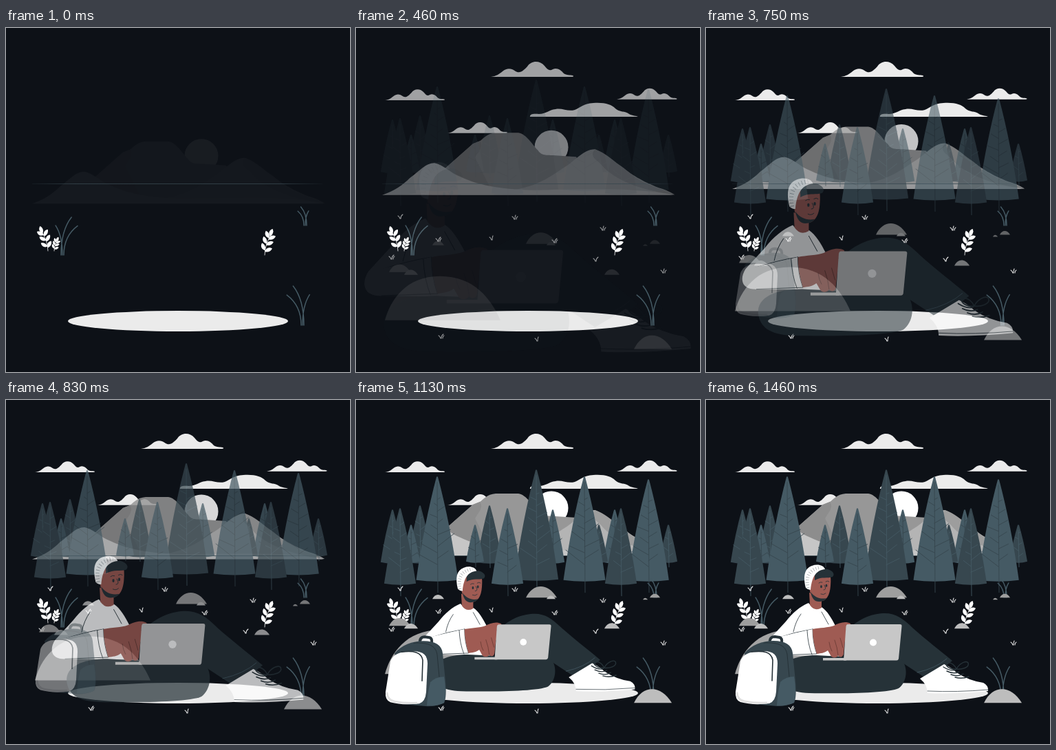
Animation of 500 by 500 pixels, one loop 1.5 s. Source, as an HTML page:

```html
<!DOCTYPE html>
<html lang="en">
<head>
<meta charset="utf-8">
<title>Working outdoors</title>
<style>
html, body { margin: 0; width: 100%; height: 100%; overflow: hidden; background: #0d1117; }
svg { display: block; width: 100vw; height: 100vh; }
</style>
</head>
<body>
<svg viewBox="0 0 500 500" fill="none" stroke-linecap="round" stroke-linejoin="round">
  <defs>
    <linearGradient id="fade">
      <stop offset="0" stop-color="#37474f" stop-opacity=".2"/>
      <stop offset=".15" stop-color="#37474f"/>
      <stop offset=".85" stop-color="#37474f"/>
      <stop offset="1" stop-color="#37474f" stop-opacity=".1"/>
    </linearGradient>
    <path id="puff" d="M0 0C8 -1 12 -4 17 -8C24 -14 31 -12 36 -8C43 -4 48 -10 53 -15C59 -24 71 -24 78 -16C82 -11 85 -8 90 -11C96 -14 102 -10 106 -5C110 -2 115 -3 119 -2C121 -1 120 0 117 0Z"/>
  </defs>

  <g id="clouds" fill="#ebebeb">
    <use href="#puff" transform="translate(196 71)"/>
    <use href="#puff" transform="translate(42 105) scale(.725)"/>
    <use href="#puff" transform="translate(379 103.7) scale(.73)"/>
    <use href="#puff" transform="translate(133 152.8) scale(.725)"/>
    <path d="M253 129C252 125 258 124 266 125C276 125 280 119 290 118C300 116 308 122 318 119C326 116 330 110 345 109C362 108 371 111 377 117C383 123 391 120 397 125C402 128 407 127 410 129Z"/>
  </g>

  <g id="hills">
    <circle cx="284" cy="157" r="24.5" fill="#fff"/>
    <path fill="#979797" d="M110 205L170 152L180 148C186 144 190 137 203 136H236C248 138 256 153 264 161C270 170 276 168 290 169L320 171L350 226H100Z"/>
    <path fill="#8d8d8d" d="M180 148C186 155 178 164 173 172L200 226H110V205L170 152Z"/>
    <path fill="#b4b4b4" d="M200 222C250 220 273 207 300 188C318 178 330 160 347 160C356 163 362 168 380 181C402 198 415 206 440 216Q452 219 463 226H150Z"/>
    <path fill="#9d9d9d" d="M347 160C338 172 352 176 358 184C370 198 400 218 463 226C450 219 440 218 425 211C402 201 395 190 380 181C365 168 356 163 347 160Z"/>
    <path fill="#c6c6c6" d="M38 226.500C55 221 68 212 78 202C92 192 101 180 114 180C127 182 136 194 152 200C180 214 220 219 260 219C330 219 400 214 462 226.500Z"/>
  </g>
  <rect x="38" y="226" width="422" height=".8" fill="url(#fade)"/>

  <g id="trees"></g>
  <g id="blades" stroke="#455a64" stroke-width="1.5"></g>
  <g id="leaves" fill="#fff" stroke="#fff" stroke-width=".8"></g>
  <ellipse cx="250" cy="426" rx="160" ry="15" fill="#ebebeb"/>
  <g id="tufts" stroke="#ebebeb" stroke-width="1.1"></g>

  <g id="rocks">
    <path fill="#a3a3a3" d="M42 399C50 370 72 335 122 335C172 335 196 368 210 399Z"/>
  </g>

  <g id="person">
    <path fill="#263238" d="M200 378L206 334C224 316 244 310 260 310C276 310 287 318 300 331C318 347 340 364 358 379Q340 395 316 402L278 377L268 400Z"/>
    <path stroke="#455a64" stroke-width=".8" d="M350 376Q334 390 307 396"/>
    <path fill="#fff" d="M311 405L346 384Q357 389 364 396Q382 408 403 411Q411 415 410 423Q360 428 322 426Q322 414 311 405Z"/>
    <path stroke="#263238" stroke-width=".7" d="M322 423Q365 425 410 421"/>
    <path stroke="#263238" stroke-width="1.4" d="M345 388Q356 395 363 392M350 394Q360 399 368 395M356 399Q366 403 374 398M362 403Q372 406 382 402M363 391C353 392 345 384 351 382C357 381 362 386 364 391C368 383 378 378 381 382C384 389 371 392 364 391"/>

    <path fill="#fff" d="M149 295C137 300 126 309 116 322L93 347C86 358 88 370 102 371L190 372L188 328C183 318 176 306 168 301C160 306 154 301 149 295Z"/>
    <path fill="#9f5b53" d="M150 280L151 298Q158 308 168 302L168 288Z"/>
    <path stroke="#263238" stroke-width=".8" d="M138 311Q130 322 127 337M103 346Q130 337 155 333M168 308L178 326"/>
    <path fill="#263238" d="M108 400C106 380 130 371 160 371L285 378C294 390 292 410 280 419C265 426 200 427 150 426C120 425 110 415 108 400Z"/>

    <path fill="#9f5b53" d="M150 265C150 281 154 293 164 293C175 293 180 284 181 270Q182 258 180 253L158 250Z"/>
    <path fill="#263238" d="M152 279C154 289 158 293 164 293C169 293 173 291 175 288C166 290 158 287 152 279Z"/>
    <path fill="#263238" d="M158 259C157 248 167 245 177 246C184 248 188 253 184 257C176 260 169 256 158 262Z"/>
    <path fill="#fff" d="M145 273C141 256 143 245 154 241C162 238 171 240 173 246C162 247 154 254 152 276Q148 276 145 273Z"/>
    <path stroke="#9aa0a3" stroke-width="5" stroke-dasharray=".7 3" stroke-linecap="butt" d="M148 273C145 256 150 246 167 243"/>
    <path stroke="#263238" stroke-width=".8" d="M172 269Q176 276 171 276M167 282Q171 284 174 281M164 266Q166 264 169 265M174 264Q177 262 179 264"/>
    <path stroke="#263238" stroke-width="2.600" d="M167.500 270.500V272M175 269V270.500"/>

    <path fill="#c7c7c7" d="M170 375H204V378.500H170Z"/>
    <path fill="#fff" d="M99 346L155 333L161 369L104 371Z"/>
    <path stroke="#263238" stroke-width=".8" d="M147 335Q148 355 154 370M155 333Q155 352 161 369L106 371"/>
    <path fill="#9f5b53" d="M155 333C165 331 178 331 186 328C193 324 203 321 210 325C211 329 207 332 203 334C207 338 205 345 202 350L200 368C200 374 194 375 192 371C191 375 183 376 181 371L177 364C172 368 167 368 161 369Q155 350 155 333Z"/>
    <path stroke="#5f342f" stroke-width=".7" d="M187 349Q191 360 192 371M179 352Q180 360 183 365M195 346L199 360"/>
    <path fill="#c7c7c7" d="M206 326H282Q285 326 284.500 329L280 376Q279.500 378.500 277 378.500H200L203.500 329Q204 326 206 326Z"/>
    <circle cx="243" cy="352.500" r="5" fill="#fff"/>
  </g>

  <g id="bag">
    <path stroke="#263238" stroke-width="4" d="M93 353Q92 344 100 344L107 345Q111 346 110 354"/>
    <path fill="#37474f" d="M56 368C66 356 82 350 98 350C115 350 125 356 126 368L130 408Q132 432 128 440Q118 445 104 445L70 442Z"/>
    <path fill="#455a64" d="M108 410Q116 402 128 402Q132 425 128 440Q118 445 103 444Q104 425 108 410Z"/>
    <path fill="#fff" d="M50 380C54 368 66 365 84 365C98 365 104 371 104 383L102 424Q101 438 92 441Q68 444 50 439Q42 436 43 424Z"/>
    <path stroke="#e0e0e0" stroke-width="3" d="M45 426Q46 436 56 438Q72 441 88 440"/>
    <path stroke="#263238" stroke-width="1.600" d="M66 366C84 364 95 366 97 378L96 408"/>
    <path stroke="#263238" d="M84 353C106 352 116 357 118 370L121 402"/>
  </g>
</svg>
<script>
const $ = id => document.getElementById(id);
const add = (id, html) => $(id).insertAdjacentHTML('beforeend', html);
let seed = 7;
const rand = () => (seed = seed * 16807 % 2147483647) / 2147483647;

function tree(x, top, low, dark) {
  const h = low - top, w = 3.5 + h * .18;
  const colors = ['#455a64', '#37474f'];
  let d = `M${x} ${top + 8}L${x + 1} ${low + (low > 240 ? 18 : 8)}`;
  for (let i = 0, n = h / 13; i < n; i++) {
    const part = .22 + .66 * i / n, reach = (i % 2 ? -w : w) * part * (.5 + .7 * rand());
    d += `M${x} ${top + h * part}l${reach} ${-Math.abs(reach) * (.4 + .4 * rand())}`;
  }
  add('trees', `<path fill="${colors[+dark]}" d="M${x - 1} ${top}Q${x} ${top - 1} ${x + 1} ${top}
    Q${x + w * .62} ${top + h * .45} ${x + w} ${low}Q${x} ${low + 4} ${x - w} ${low}
    Q${x - w * .62} ${top + h * .45} ${x - 1} ${top}Z"/><path stroke="${colors[+!dark]}" stroke-width=".9" d="${d}"/>`);
}
function grove(top, low, light, dark) {
  dark.forEach(x => tree(x, top, low, true));
  light.forEach(x => tree(x, top, low, false));
}
grove(159, 235, [286, 376], [53]);
grove(153, 235, [], [93, 194]);
grove(181, 234, [80, 173], [353, 454]);
grove(101, 260, [], [262]);
grove(111, 261, [118, 332], []);
grove(115, 261, [425], []);
grove(157, 266, [220], [64, 385]);

// three bent blades, the tallest leaning to one side
function grass(x, y, h, lean) {
  const d = [[.24, 1], [-.18, .78], [.4, .77]].map(([dx, dy], i) => {
    const foot = x + (i - 1) * 2 * lean;
    return `M${foot} ${y}Q${foot} ${y - h * dy * .65} ${x + lean * dx * h} ${y - h * dy}`;
  });
  add('blades', `<path d="${d.join('')}"/>`);
}
grass(82, 330, 55, 1);
grass(435, 287, 27, -1);
grass(431, 432, 57, -1);

// stem with a leaf at the tip and pairs below it
function sprig(x, y, dx, dy, size) {
  const turn = Math.atan2(dy, dx) * 180 / Math.PI;
  const leaf = (u, bend) => `<path stroke="none" transform="translate(${x + dx * u * u} ${y + dy * u}) rotate(${turn + bend}) scale(${size})"
    d="M0 0C3 -4 8 -4 11 0C8 3 3 3 0 0Z"/>`;
  let html = `<path fill="none" d="M${x} ${y}Q${x} ${y + dy / 2} ${x + dx} ${y + dy}"/>` + leaf(.8, 0);
  for (const u of [.2, .48, .72]) html += leaf(u, -42) + leaf(u - .05, 48);
  add('leaves', html);
}
sprig(61, 324, -12, -32, 1);
sprig(70, 324, 6, -17, .65);
sprig(376, 330, 12, -34, 1.05);

[[64, 277], [230, 278], [119, 310], [197, 308], [288, 312], [358, 294], [348, 339], [446, 356], [123, 451], [263, 455], [51, 336]]
  .forEach(([x, y], i) => add('tufts', `<path d="M${x} ${y}q-1 -3 -3 -4M${x + 1} ${y}q0 -4 ${i % 2 ? 1 : 3} -6${i % 3 ? `M${x + 3} ${y}q0 -3 2 -4` : ''}"/>`));

// left, base, width
[[48, 329, 31], [70, 333, 20], [247, 288, 45], [277, 290, 13], [427, 288, 15], [111, 290, 17], [417, 291, 7], [361, 333, 22], [404, 441, 55]]
  .forEach(([x, y, w], i) => add('rocks', `<path fill="${i % 2 || i > 6 ? '#bdbdbd' : '#9e9e9e'}"
    d="M${x} ${y}c${w * .22} ${-w * .47} ${w * .7} ${-w * .5} ${w} 0Z"/>`));

const clamp = v => Math.max(0, Math.min(1, v));
const ramp = (t, from, length) => clamp((t - from) / length);

// cubic-bezier(.36, -.01, .5, 1.38): overshoots, then settles
function spring(x) {
  const bez = (s, a, b) => 3 * (1 - s) * (1 - s) * s * a + 3 * (1 - s) * s * s * b + s * s * s;
  let lo = 0, hi = 1;
  for (let i = 0; i < 24; i++) {
    const mid = (lo + hi) / 2;
    if (bez(mid, .36, .5) < x) lo = mid; else hi = mid;
  }
  return bez(lo, -.01, 1.38);
}

function pose(id, p, move = '') {
  $(id).setAttribute('opacity', clamp(p));
  $(id).setAttribute('transform', move);
}
const rise = p => `translate(0 ${30 * (1 - p)})`;
const fall = p => `translate(0 ${30 * (p - 1)})`;

function draw(ms) {
  // stepped at 24 pictures a second
  const t = Math.max(1, Math.floor((ms % 1500 + 4) * .024)) / 24;
  const hill = ramp(t, 0, 1), fade = ramp(t, .12, .51);
  const grow = spring(ramp(t, .2, 1.3));
  const zoom = spring(ramp(t, .345, 1));
  const drop = spring(ramp(t, .54, .85));
  pose('clouds', fade);
  pose('tufts', fade);
  pose('hills', hill, rise(hill));
  pose('trees', grow, fall(grow));
  pose('rocks', grow, rise(grow));
  pose('person', zoom, `translate(250 333) scale(${1.5 - .5 * zoom}) translate(-250 -333)`);
  pose('bag', drop, fall(drop));
}

const start = performance.now();
function tick() {
  draw(performance.now() - start);
  requestAnimationFrame(tick);
}
tick();
</script>
</body>
</html>
```
